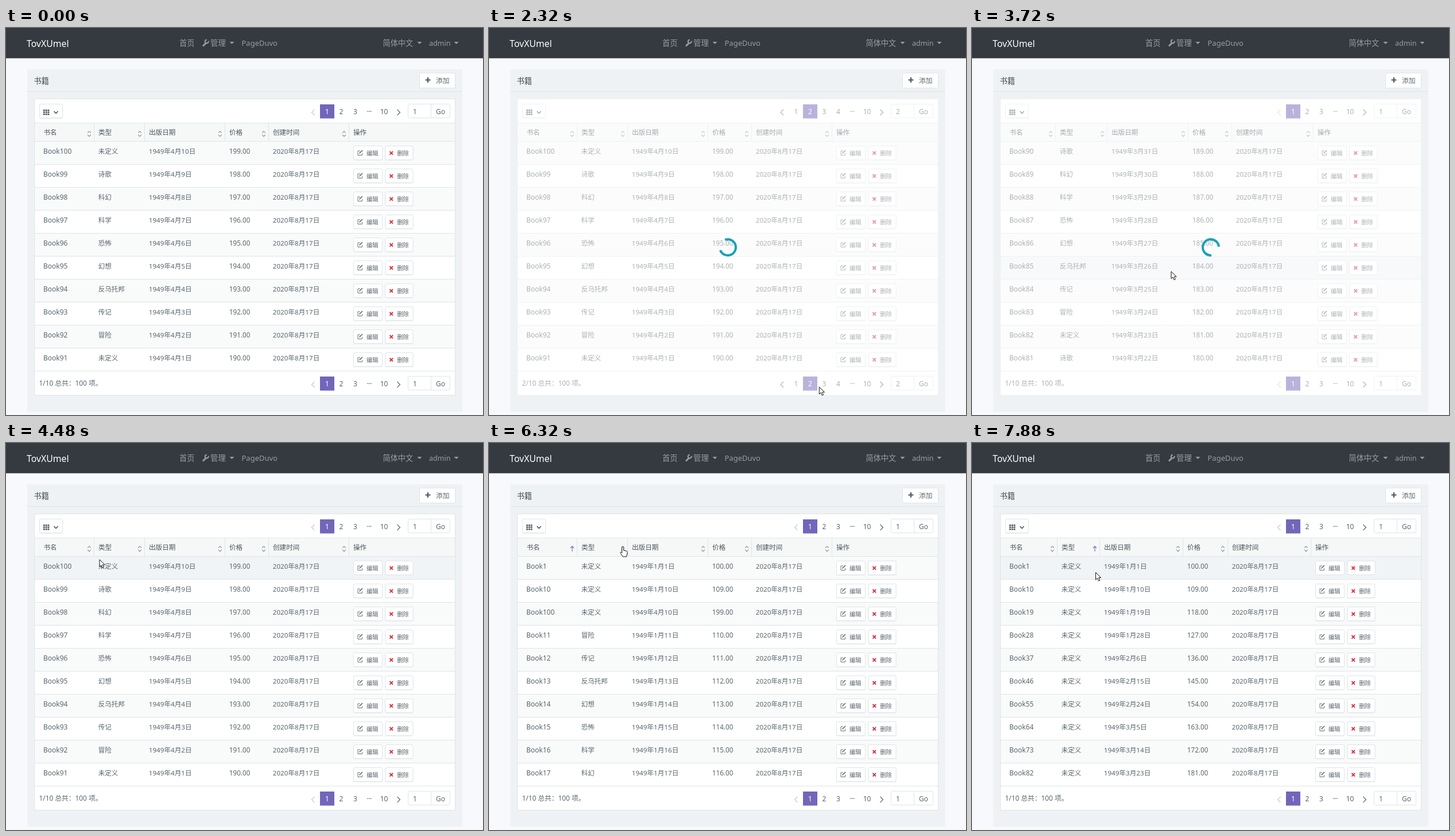
Write an HTML page that moves like this. It is 831 by 674 pixels and loops after 8000 ms.

```html
<!DOCTYPE html>
<html lang="zh-CN">
<head>
<meta charset="utf-8">
<style>
html, body { margin: 0; width: 100%; height: 100%; overflow: hidden; background: #f8f9fc; }
svg { display: block; font-family: "Noto Sans", "Noto Sans CJK SC", "Noto Sans CJK", sans-serif; }
</style>
</head>
<body>
<svg id="stage" width="831" height="674" viewBox="0 0 831 674"></svg>
<script>
const LOOP = 8000;
const stage = document.getElementById('stage');
const INK = '#58666e', LINE = '#dee5e7', PURPLE = '#7266ba', NAV = '#9a9da0';
const TYPES = ['未定义', '冒险', '传记', '反乌托邦', '幻想', '恐怖', '科学', '科幻', '诗歌'];
const HEADS = ['书名', '类型', '出版日期', '价格', '创建时间', '操作'];

// Column separators and book numbers of each table view
const WIDE = [153.5, 241.5, 381.5, 457.5, 597.5];
const VIEWS = [
  { cols: WIDE, book: i => 100 - i },
  { cols: [145.5, 235.5, 376.5, 452.5, 594.5], book: i => 90 - i },
  { cols: WIDE, book: i => [1, 10, 100][i] || i + 8 },
  { cols: [148.5, 222.5, 367.5, 445.5, 590.5], book: i => 1 + 9 * i }
];

const LOADS = [
  { click: 1600, fade: 2000, data: 2480, end: 2800, angle: 222, page: 2, sort: -1, view: 1 },
  { click: 3080, fade: 3205, data: 3800, end: 4100, angle: 103, page: 1, sort: -1, view: 0 },
  { click: 5180, fade: 5245, data: 5900, end: 6200, angle: 164, page: 1, sort: 0, view: 2 },
  { click: 6700, fade: 6760, data: 7200, end: 7660, angle: 0, page: 1, sort: 1, view: 3 }
];

// Screen refreshes: start, end, number of steps
const BURSTS = [[120, 1080, 7], [1240, 1840, 5], [2160, 3080, 7], [3240, 4160, 7],
  [4320, 5280, 7], [5400, 6320, 7], [6520, 7440, 7], [7600, 7880, 3]];

// Pointer: time, x, y, hand
const PATH = [[120, 191, 212], [1080, 676, 608], [1240, 584, 618, 1], [1560, 585, 622, 1],
  [1680, 586, 626], [2160, 586, 626], [2800, 512, 620, 1], [3080, 512, 621, 1],
  [3240, 513, 622], [4160, 181, 226], [4480, 163, 203], [4800, 145, 183, 1],
  [5240, 146, 183, 1], [5400, 168, 190], [6160, 233, 181, 1], [7080, 233, 181, 1],
  [7400, 217, 228], [7880, 215.5, 225.5]];

const clamp = v => Math.max(0, Math.min(1, v));

function text(x, y, s, size = 12, fill = INK, anchor = 'start') {
  return `<text x="${x}" y="${y}" font-size="${size}" fill="${fill}" text-anchor="${anchor}">${s}</text>`;
}
function rect(x, y, w, h, fill, stroke = 'none', r = 0) {
  return `<rect x="${x}" y="${y}" width="${w}" height="${h}" fill="${fill}" stroke="${stroke}" rx="${r}"/>`;
}
function stroke(d, color, width = 1) {
  return `<path d="${d}" fill="none" stroke="${color}" stroke-width="${width}"/>`;
}
function fill(d, color) {
  return `<path d="${d}" fill="${color}"/>`;
}
function button(x, y, w, h) {
  return rect(x, y + 1, w, h, '#e6eaec', '#eef1f2', 2) + rect(x, y, w, h, '#fff', LINE, 2);
}
const caret = x => fill(`M${x} 24h8l-4 4z`, NAV);

function frame() {
  return rect(0, 0, 831, 52.7, '#343a40') +
    text(36, 32.5, 'TovXUmel', 15.8, '#fff') +
    text(302, 31, '首页', 13.2, NAV) +
    stroke('M343 31.5L349 25.5', NAV, 3) +
    stroke('M352.6 22.6A3 3 0 1 1 349.8 20.5', NAV, 2.2) +
    text(356, 31, '管理', 13.4, NAV) + caret(389.5) +
    text(410.5, 31, 'PageDuvo', 13, NAV) +
    text(656.5, 31, '简体中文', 13.2, NAV) + caret(716.5) +
    text(737, 31, 'admin', 12.6, NAV) + caret(780.5) +
    rect(37, 72, 758, 596, '#eef2f4', 'none', 2) +
    stroke('M37 110.5H795', LINE) +
    text(48.5, 96.5, '书籍', 13.2, '#3f4b55') +
    button(720.5, 78.5, 62, 26) +
    stroke('M730.5 90.5H739.5M735 86V95', '#4a565e', 2.2) +
    text(749, 95.5, '添加', 11.8) +
    rect(49.5, 123.5, 733, 516, '#fff', LINE);
}

function pager(y, page) {
  const first = 559.5 - 24.5 * (page - 1);
  const chevron = (x, dir, color) =>
    stroke(`M${x - 2.5 * dir} ${y - 3}l${5 * dir} 5l${-5 * dir} 5`, color, 1.1);
  let out = chevron(first - 24.5, -1, page > 1 ? INK : '#c2c9cd');
  out += rect(547, y - 12, 25, 24.5, PURPLE);
  for (let n = 1; n <= page + 2; n++) {
    out += text(first + 24.5 * (n - 1), y + 4.5, n, 12, n === page ? '#fff' : INK, 'middle');
  }
  for (const x of [629.5, 632.2, 634.9]) out += rect(x, y - .5, 1.5, 1.5, INK);
  return out + text(658.5, y + 4.5, 10, 12, INK, 'middle') + chevron(684, 1, INK) +
    rect(700.5, y - 12.5, 73, 24, '#fff', LINE, 2) + stroke(`M740.5 ${y - 12}v23`, LINE) +
    text(709, y + 4.5, page, 12) + text(757, y + 4.5, 'Go', 12, INK, 'middle');
}

function toolbar() {
  let out = button(58.5, 132.5, 40, 24);
  for (let i = 0; i < 9; i++) {
    out += rect(65 + i % 3 * 3.8, 142 + Math.floor(i / 3) * 3.5, 2.8, 2.6, '#4a565e');
  }
  return out + stroke('M83.5 145l3.5 3.5l3.5 -3.5', '#4a565e', 1.6);
}

function header(cols, sort) {
  let out = rect(50, 165, 732, 33, '#f6f8f8') + stroke('M50 165.5H782M50 197.5H782', LINE);
  HEADS.forEach((h, i) => {
    out += text(i ? cols[i - 1] + 7.5 : 65.5, 186, h, 11.6, '#4a565e');
    if (i === 5) return;
    const x = cols[i] - 8.5;
    out += stroke(`M${cols[i]} 166V197`, LINE);
    out += i === sort
      ? stroke(`M${x} 189V180M${x - 3} 183l3 -3.2l3 3.2`, PURPLE, 1.1)
      : stroke(`M${x - 2.8} 182.6l2.8 -2.8l2.8 2.8M${x - 2.8} 186l2.8 2.8l2.8 -2.8`, '#8b959b', 1.2);
  });
  return out;
}

function row(i, n, cols, hover) {
  const y = 198 + 40 * i, base = y + 21;
  const date = new Date(1949, 0, n);
  const x = cols[4] + 8;
  const bg = hover ? '#f0f4f6' : i % 2 ? '#fff' : '#f9fafa';
  const cells = ['Book' + n, TYPES[(n - 1) % 9],
    `1949年${date.getMonth() + 1}月${date.getDate()}日`, `${99 + n}.00`, '2020年8月17日'];
  let out = rect(50, y, 732, 39, bg) + stroke(`M50 ${y + 39.5}H782`, LINE);
  cells.forEach((c, k) => {
    out += text(k ? cols[k - 1] + 7.3 : 65, base, c, [12, 11.5, 11.65, 11.7, 11.65][k]);
  });
  return out + button(x, y + 7.5, 50, 24) + button(x + 55.5, y + 7.5, 48, 24) +
    stroke(`M${x + 11.5} ${y + 16}h-4v7.5h7.5v-3.5`, INK, .9) +
    stroke(`M${x + 10} ${y + 20.5}l5.5 -5.5`, INK, 1.6) +
    text(x + 22.5, y + 24.4, '编辑', 10.3) +
    stroke(`M${x + 63} ${y + 17}l5.6 5.6m0 -5.6l-5.6 5.6`, '#d9303e', 1.9) +
    text(x + 75.7, y + 24.4, '删除', 10.3);
}

function spinner(angle) {
  return `<circle cx="416" cy="382" r="14" fill="none" stroke="#17a2b8" stroke-width="4"
    pathLength="360" stroke-dasharray="270 90" transform="rotate(${angle + 45} 416 382)"/>`;
}

function pointerAt(t) {
  if (t < PATH[0][0]) return null;
  const k = PATH.findLastIndex(p => p[0] <= t);
  const a = PATH[k], b = PATH[k + 1] || a;
  const u = clamp((t - a[0]) / (b[0] - a[0] || 1)), e = u * u * (3 - 2 * u);
  return { x: a[1] + (b[1] - a[1]) * e, y: a[2] + (b[2] - a[2]) * e, hand: a[3] };
}

function pointer({ x, y, hand }) {
  const d = hand
    ? 'M0 0c1.4 0 1.6 .8 1.6 1.6v4.4l5.2 1.2c1 .3 1.4 1 1.3 2l-.7 4.6l-1 3.2h-6l-4 -5.5c-1.6 -2 .2 -3 1.3 -2l1 1v-9c0 -.9 .3 -1.5 1.3 -1.5z'
    : 'M0 0v12.6l2.9 -2.8l2.1 4.9l2.3 -1l-2.1 -4.7h4z';
  return `<path d="${d}" transform="translate(${x} ${y})" fill="#fff" stroke="#111" stroke-linejoin="round"/>`;
}

// Holds the picture between screen refreshes
function snap(t) {
  const burst = BURSTS.findLast(b => b[0] <= t);
  if (!burst) return 0;
  const [start, end, count] = burst, gap = (end - start) / (count - 1);
  return Math.min(end, start + Math.floor((t - start + 20) / gap) * gap);
}

function draw(t) {
  const load = LOADS.findLast(l => l.click <= t);
  const { page, sort } = load || { page: 1, sort: -1 };
  const loaded = LOADS.findLast(l => l.data <= t);
  const { cols, book } = VIEWS[loaded ? loaded.view : 0];
  const mouse = pointerAt(t);
  const over = mouse && mouse.y < 598 ? Math.floor((mouse.y - 198) / 40) : -1;

  let out = frame() + toolbar() + pager(145, page) + header(cols, sort);
  for (let i = 0; i < 10; i++) out += row(i, book(i), cols, i === over);
  out += text(57.5, 622.5, `${page}/10 总共：100 项。`, 11.8) + pager(619, page);
  if (load && t < load.end) {
    const veil = .5 * clamp(Math.min((t - load.fade) / 220, (load.data + 200 - t) / 200));
    out += `<g opacity="${veil}">${rect(49, 123, 734, 517, '#fff')}</g>`;
    out += spinner(load.angle + (t - load.click) * .48);
  }
  if (mouse) out += pointer(mouse);
  stage.innerHTML = out;
}

let last = -1;
const begin = performance.now();
function tick() {
  const t = snap((performance.now() - begin) % LOOP);
  if (t !== last) draw(last = t);
  requestAnimationFrame(tick);
}
tick();
</script>
</body>
</html>
```
